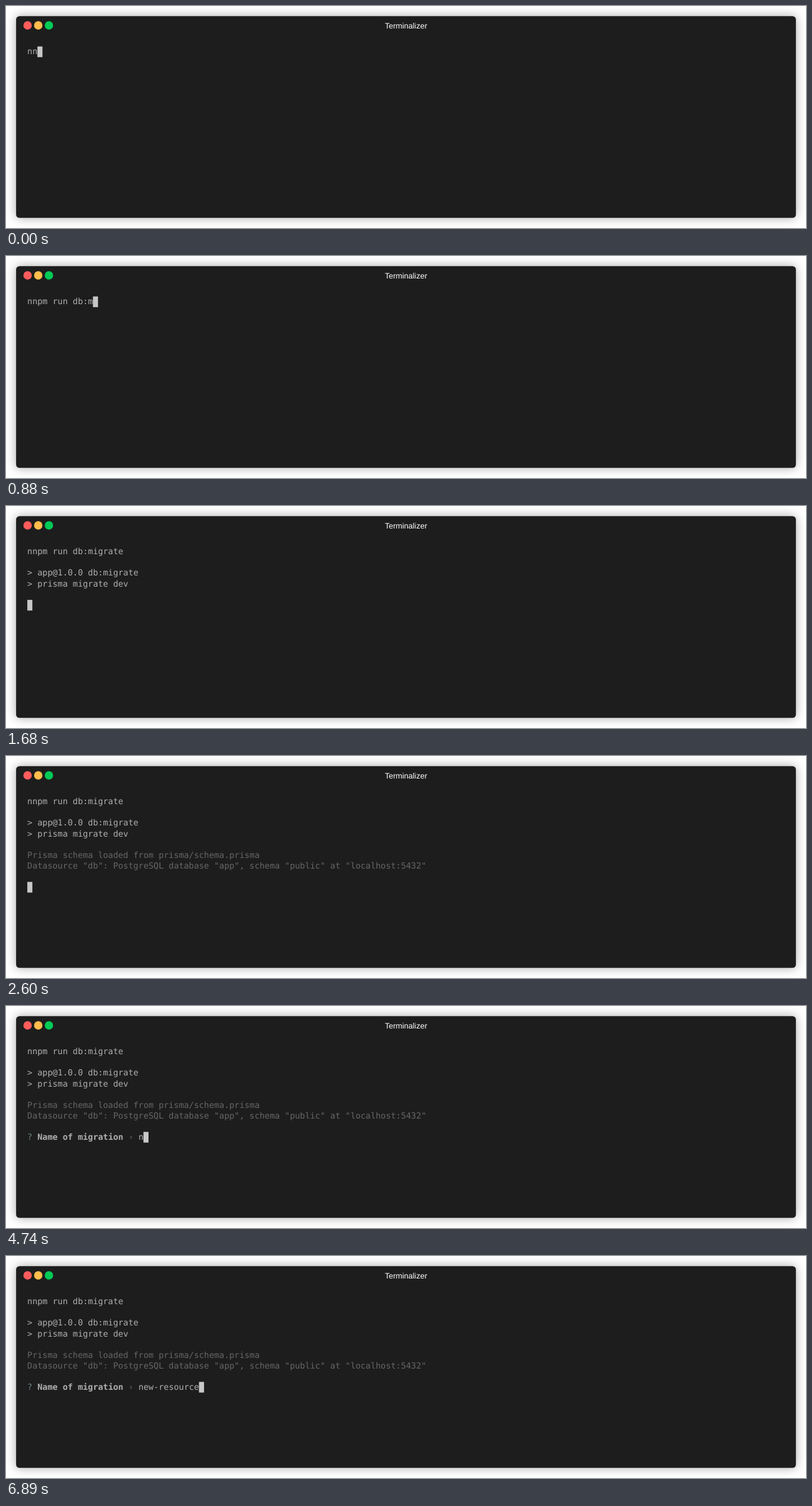
An HTML page for the animation above (8 s loop, 1280x355 px).

```html
<!DOCTYPE html>
<html lang="en">
<head>
<meta charset="utf-8">
<title>Terminal</title>
<style>
  html, body { margin: 0; width: 100%; height: 100%; overflow: hidden; background: #fff; }
  #stage {
    position: absolute; left: 0; top: 0; width: 1426px; height: 395px;
    transform: scale(calc(1280 / 1426), calc(355 / 395)); transform-origin: 0 0;
    text-rendering: geometricPrecision;
  }
  #window {
    position: absolute; left: 18px; top: 18px; width: 1390px; height: 359px;
    border-radius: 6px; background: #1d1d1d; box-shadow: 0 0 18px rgba(0, 0, 0, .35);
  }
  .button { position: absolute; top: 9px; width: 15px; height: 15px; border-radius: 50%; }
  #title {
    position: absolute; left: 0; right: 0; top: 9px; text-align: center; color: #fff;
    font: 14px/16px "Liberation Sans", Arial, sans-serif;
  }
  #screen {
    position: absolute; left: 20px; top: 54px; color: #afafaf; white-space: pre;
    font: 15px/19px "DejaVu Sans Mono", monospace;
    letter-spacing: calc(9px - .60205em); font-variant-ligatures: none;
  }
  .row { position: absolute; left: 0; top: calc(var(--row) * 19px); height: 19px; }
  .dim { color: #666; }
  .mark { color: #708387; }
  #cursor { position: absolute; left: 0; top: 0; width: 9px; height: 19px; background: #c7c7c7; }
</style>
</head>
<body>
<div id="stage">
  <div id="window">
    <div class="button" style="left: 13px; background: #ff5c5c"></div>
    <div class="button" style="left: 32px; background: #ffbd4c"></div>
    <div class="button" style="left: 51px; background: #00ca56"></div>
    <div id="title">Terminalizer</div>
    <div id="screen">
      <div class="row" id="command" style="--row: 0"></div>
      <div class="row" data-at="1680" style="--row: 2">&gt; app@1.0.0 db:migrate</div>
      <div class="row" data-at="1680" style="--row: 3">&gt; prisma migrate dev</div>
      <div class="row dim" data-at="2550" style="--row: 5">Prisma schema loaded from prisma/schema.prisma</div>
      <div class="row dim" data-at="2600" style="--row: 6">Datasource "db": PostgreSQL database "app", schema "public" at "localhost:5432"</div>
      <div class="row" data-at="3720" style="--row: 8"><span class="mark">?</span> <b>Name of migration</b> <span class="dim">›</span> <span id="answer"></span></div>
      <div id="cursor"></div>
    </div>
  </div>
</div>
<script>
  const LOOP = 8000, KEY_DELAY = 80;
  const COMMAND = "nnpm run db:migrate", ANSWER = "new-resource";
  const PROMPT_AT = 3720, PROMPT_COLS = 22;
  const answerKeys = [4740, 4860, 5090, 5590, 5820, 5990, 6170, 6270, 6450, 6530, 6780, 6890];
  // [time, row] of each cursor jump to the start of a line
  const lineStarts = [[1440, 1], [1680, 5], [2550, 6], [2600, 8]];

  const command = document.getElementById("command");
  const answer = document.getElementById("answer");
  const cursor = document.getElementById("cursor");
  const timedRows = [...document.querySelectorAll("[data-at]")];

  function setText(el, text) {
    if (el.textContent !== text) el.textContent = text;
  }

  function cursorCell(t, typed, answered) {
    if (t >= PROMPT_AT) return [PROMPT_COLS + answered, 8];
    const start = lineStarts.filter(([at]) => t >= at).pop();
    return start ? [0, start[1]] : [typed, 0];
  }

  function render(t) {
    const typed = Math.min(COMMAND.length, 2 + Math.floor(t / KEY_DELAY));
    const answered = answerKeys.filter(at => t >= at).length;
    setText(command, COMMAND.slice(0, typed));
    setText(answer, ANSWER.slice(0, answered));
    for (const row of timedRows) row.style.visibility = t >= +row.dataset.at ? "visible" : "hidden";
    const [col, row] = cursorCell(t, typed, answered);
    cursor.style.left = col * 9 + "px";
    cursor.style.top = row * 19 + "px";
  }

  const startTime = performance.now();
  function tick() {
    render((performance.now() - startTime) % LOOP);
    requestAnimationFrame(tick);
  }
  tick();
</script>
</body>
</html>
```
